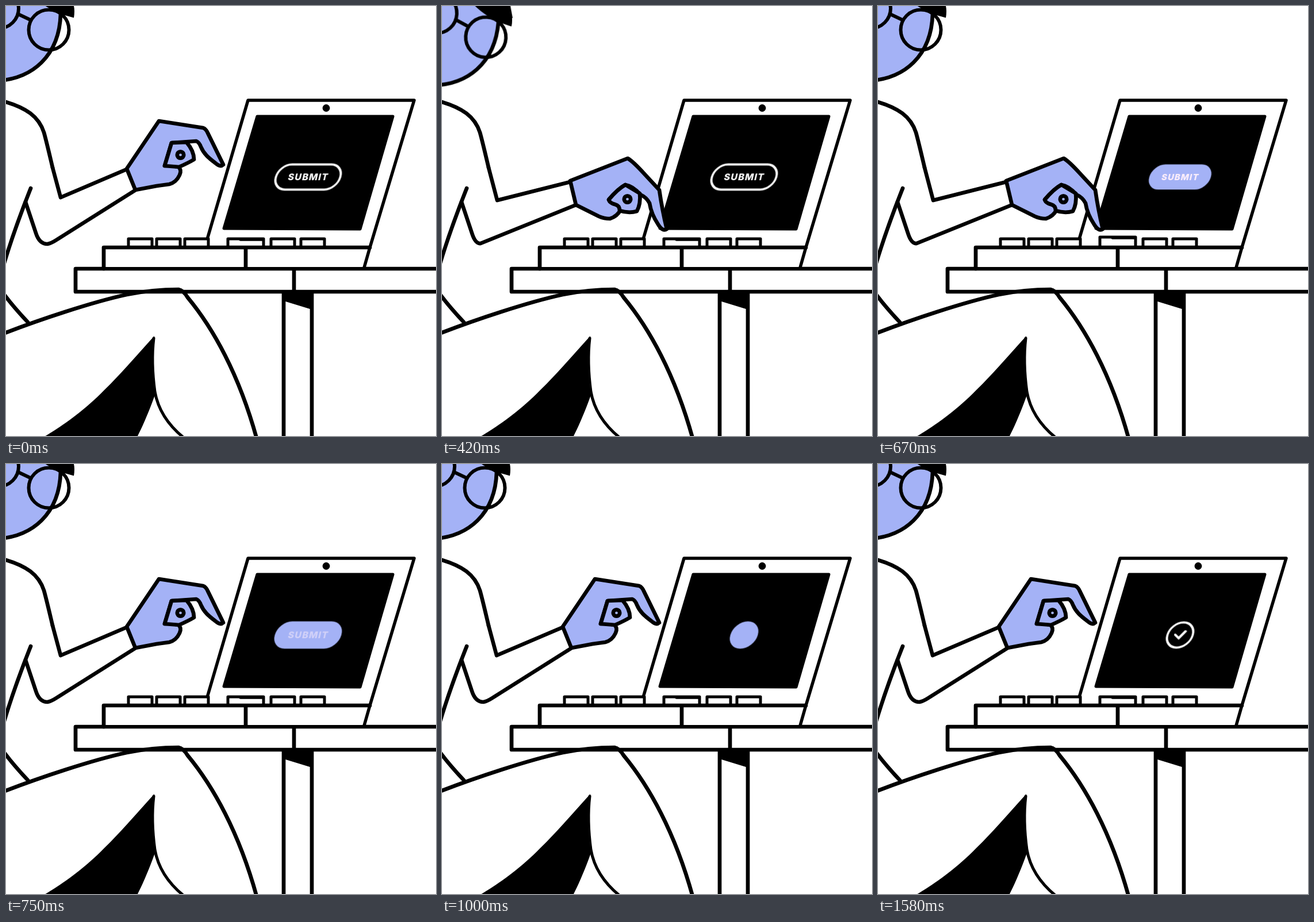
An HTML page for the animation above (2.51 s loop, 748x748 px).

```html
<!DOCTYPE html>
<html lang="en">
<head>
<meta charset="utf-8">
<title>Submit</title>
<style>
  html, body { margin: 0; width: 100%; height: 100%; overflow: hidden; background: #fff; }
  svg { display: block; width: 100%; height: 100%; }
  svg { --blue: #a4b2f6; --ink: #000; fill: none; stroke: var(--ink); stroke-width: 6.7; stroke-linecap: round; stroke-linejoin: round; }
  .skin { fill: var(--blue); }
  .paper { fill: #fff; }
  .solid { fill: var(--ink); stroke: none; }
  .keys { stroke-width: 5; }
  .ring { fill: var(--blue); }
  text { font: 800 16px Inter, "Open Sans", sans-serif; letter-spacing: 1.2px; text-anchor: middle; fill: #fff; stroke: none; }

  /* Every drawing is held, so all changes are hard steps. */
  .anim { animation: 2510ms step-end infinite; }
  .head { animation-name: nod; }
  .rest { animation-name: rest; }
  .lift { animation-name: lift; }
  .hover { animation-name: hover; }
  .press { animation-name: press; }
  .space { animation-name: space; }
  .button { animation-name: pop; }
  .pill { animation-name: pill; }
  .label { animation-name: label; }
  .tick { animation-name: tick; stroke: #fff; stroke-width: 4; stroke-dasharray: 1 2; }

  @keyframes nod {
    0%, 26.693% { transform: none; }
    16.733% { transform: translate(4px, 9px) rotate(3deg); }
  }
  @keyframes rest {
    0%, 29.88%, 36.653%, 100% { opacity: 1; }
    13.147%, 33.068% { opacity: 0; }
  }
  @keyframes lift {
    0%, 16.733%, 36.653%, 100% { opacity: 0; }
    13.147%, 33.068% { opacity: 1; }
  }
  @keyframes hover {
    0%, 19.92%, 29.88%, 100% { opacity: 0; }
    16.733%, 26.693% { opacity: 1; }
  }
  @keyframes press {
    0%, 26.693%, 100% { opacity: 0; }
    19.92% { opacity: 1; }
  }
  @keyframes space {
    0%, 29.88%, 100% { transform: none; }
    19.92% { transform: translateY(6px); }
    26.693% { transform: translateY(-3px); }
  }
  @keyframes pop {
    0%, 29.88%, 100% { transform: none; }
    26.693% { transform: scale(.925); }
  }
  @keyframes pill {
    0% { x: -56px; width: 112px; fill: #000; stroke: #fff; }
    23.108% { x: -56px; width: 112px; fill: #a4b2f6; stroke: #a4b2f6; }
    36.653% { x: -38px; width: 76px; fill: #a4b2f6; stroke: #a4b2f6; }
    39.841% { x: -22px; width: 44px; fill: #a4b2f6; stroke: #a4b2f6; }
    43.028%, 100% { x: -22px; width: 44px; fill: #000; stroke: #fff; }
  }
  @keyframes label {
    0% { opacity: 1; fill: #fff; }
    23.108% { opacity: 1; fill: #fff0fb; }
    29.88% { opacity: .5; fill: #fff0fb; }
    33.068%, 100% { opacity: 0; fill: #fff0fb; }
  }
  @keyframes tick {
    0% { opacity: 0; stroke-dashoffset: .7; }
    56.574% { opacity: 1; stroke-dashoffset: .7; }
    59.761% { opacity: 1; stroke-dashoffset: .35; }
    62.948%, 100% { opacity: 1; stroke-dashoffset: 0; }
  }
</style>
</head>
<body>
<svg viewBox="0 0 748 748">
  <filter id="rough" filterUnits="userSpaceOnUse" x="0" y="0" width="748" height="748" color-interpolation-filters="sRGB">
    <feTurbulence type="fractalNoise" baseFrequency=".18" numOctaves="1" seed="4"/>
    <feDisplacementMap in="SourceGraphic" scale="1.4" xChannelSelector="R" yChannelSelector="G"/>
  </filter>

  <g class="anim head">
    <path class="skin" stroke="none" d="M95 14C94 50 82 78 62 98C45 115 22 127 -12 130V-30H95Z"/>
    <path d="M95 14C94 50 82 78 62 98C45 115 22 127 -12 130"/>
    <g stroke-width="6">
      <circle cx="74.5" cy="41.5" r="35"/>
      <circle cx="-13" cy="4" r="35"/>
      <path d="M21 14L40 23"/>
    </g>
    <path class="solid" d="M40 -25C52 -10 72 4 95 14L118 20.500Q120 8 118 0L112 -25Z"/>
  </g>

  <!-- body and legs -->
  <path d="M43 317C30 350 14 390 -3 447M-3 502C12 522 22 533 38 550"/>
  <path d="M-5 570C60 545 150 515 210 502C240 496 270 493 300 493Q309 495 316 507C360 560 405 640 436 752"/>
  <path class="solid" d="M258 574C254 610 256 640 261 671C254 692 240 727 228 750H65C100 730 140 700 171 668C200 640 225 610 258 574Z"/>
  <path stroke-width="5" d="M257 578C253 612 255 642 259 671C265 705 285 731 308 750"/>

  <!-- desk and laptop -->
  <g filter="url(#rough)">
    <path d="M755 457H121V497H755M501 457V497M483 497V755M532 497V755"/>
    <path class="solid" d="M483 497H532V528L483 513Z"/>
    <path class="paper" stroke-width="5.500" d="M349 409L421 164H710L633 420"/>
    <path fill="#000" stroke-width="5" d="M437 192H673L616 388L379 387Z"/>
    <circle class="solid" cx="557" cy="177.500" r="6.400"/>
    <g class="paper keys">
      <path d="M213 419V405H254V419M262 419V405H303V419M311 419V405H352V419M461 419V405H502V419M513 419V405H554V419"/>
      <g class="anim space">
        <path d="M386 432V405H448V432"/>
        <path d="M408 406H446" stroke-width="5.500"/>
      </g>
    </g>
    <path class="paper" stroke="none" d="M170 420H633L623 454H170Z"/>
    <path d="M170 457V420H633M417 420V456"/>
    <path stroke-width="5.500" d="M633 420L623 455"/>
  </g>

  <g transform="translate(525.500 297.500)">
    <g class="anim button">
      <rect class="anim pill" transform="skewX(-16)" x="-56" y="-21.800" width="112" height="43.600" rx="21.800" stroke-width="3.800"/>
      <text class="anim label" transform="skewX(-13)" x=".6" y="6">SUBMIT</text>
    </g>
    <path class="anim tick" pathLength="1" d="M-8.500 -.5L-2.500 5.500L9.500 -6.500"/>
  </g>

  <!-- arm poses -->
  <path d="M-3 166C35 177 57 192 66 220C71 238 76 260 81 281"/>

  <g class="anim rest">
    <path d="M81 281L95 333L210 284M34 341L52 395Q58 414 72 414Q78 413 86 408L224 321"/>
    <path class="skin" d="M210 283L266 200L343 212Q348 214 351 221L378 276Q373 281 364 273C352 264 344 257 339 245Q336 237 331 235L288 238L276 278Q290 277 300 280Q306 285 302 294Q296 307 284 310L262 313L225 320Z"/>
    <path class="skin" d="M288 238L314 237Q327 252 327 267Q317 273 301 280L276 278Z"/>
    <circle class="ring" cx="303.500" cy="259" r="5.700"/>
  </g>

  <g class="anim lift" opacity="0">
    <path d="M81 281L95 333L208 286M34 341L52 395Q58 414 72 414Q78 413 86 408L226 320"/>
    <path class="skin" d="M206 285L256 195L334 202Q339 204 342 210L375 261Q369 264 356 257Q341 250 333 236Q330 225 324 223L281 230L272 272Q287 269 299 275Q303 283 299 292Q293 301 280 304L254 309L226 320Z"/>
    <path class="skin" d="M281 230L310 227Q325 243 325 257Q315 267 298 273L272 272Z"/>
    <circle class="ring" cx="298.500" cy="250" r="5.700"/>
  </g>

  <g class="anim hover" opacity="0">
    <path d="M81 281L96 338L223 306M34 341L52 395Q58 414 67 413L233 346"/>
    <path class="skin" d="M223 304L323 265Q332 270 352 292L378 320Q383 355 391 388Q384 393 376 380Q364 362 361 343Q356 333 345 328Q332 313 319 311Q306 318 290 337Q293 343 301 345Q310 348 311 354Q305 366 292 370Q282 370 273 366L233 346Z"/>
    <path class="skin" d="M319 311L344 326Q346 344 339 357Q325 361 309 356Q309 347 301 345Q292 343 290 337Q306 318 319 311Z"/>
    <circle class="ring" cx="322.500" cy="336" r="5.700"/>
  </g>

  <g class="anim press" opacity="0">
    <path d="M81 281C88 305 94 330 101 353L233 340M34 341L62 423L238 380"/>
    <path class="skin" d="M233 340L270 334Q310 329 338 334Q362 344 386 361L405 375C412 390 422 401 434 409Q416 413 406 406Q390 387 372 380L350 376Q330 362 316 362L284 371Q284 377 297 382Q312 389 314 397Q305 409 287 405Q262 397 238 381Z"/>
    <path class="skin" d="M316 362L347 374Q352 387 346 402L314 401Q313 389 297 382Q284 377 284 371Z"/>
    <circle class="ring" cx="327.500" cy="379" r="5.700"/>
  </g>
</svg>
</body>
</html>
```
